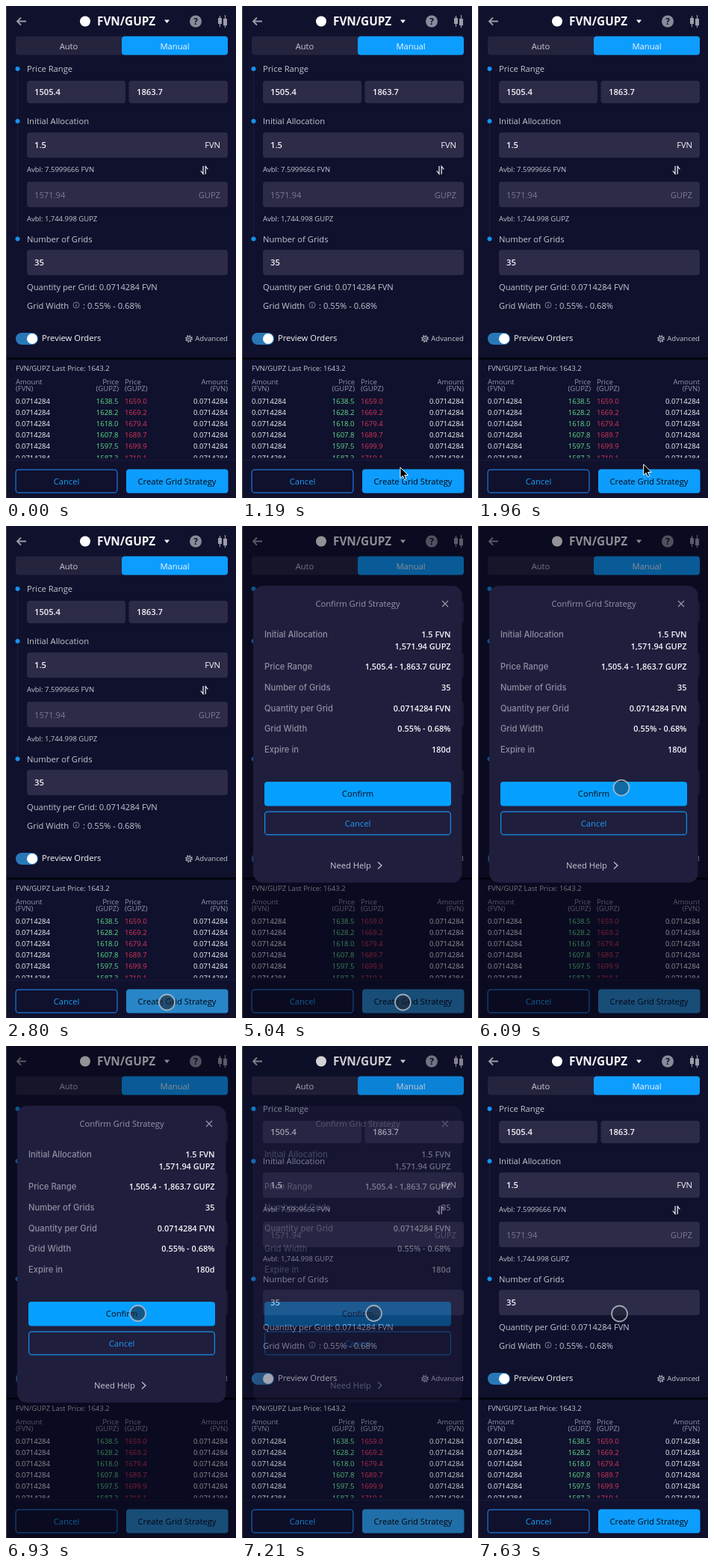
These frames come from a looping animation (308x658 px, 8000 ms). An HTML page:

```html
<!DOCTYPE html>
<html lang="en">
<head>
<meta charset="utf-8">
<title>Grid strategy</title>
<style>
html, body { margin: 0; width: 100%; height: 100%; overflow: hidden; background: #10112d; }
svg { display: block; width: 308px; height: 658px; }
text { font-family: "Open Sans", "Noto Sans", sans-serif; white-space: pre; }
.label { font-family: Inter, "Liberation Sans", sans-serif; font-weight: 500; }
</style>
</head>
<body>
<svg id="stage" viewBox="0 0 308 658"></svg>
<script>
const LOOP = 8000;
const BASE = 'FVN', QUOTE = 'GUPZ';
const WHITE = '#f6f6fa', SOFT = '#c6c6d2', GREY = '#9696a8', FIELD = '#2c2b48', BLUE = '#0d9dff';
const ANCHOR = { l: 'start', m: 'middle', r: 'end' };

const text = (s, x, y, size = 11.2, fill = SOFT, side = 'l', extra = '') =>
  `<text x="${x}" y="${y}" font-size="${size}" fill="${fill}" text-anchor="${ANCHOR[side]}" ${extra}>${s}</text>`;
const box = (x, y, w, h, fill, r = 4, extra = '') =>
  `<rect x="${x}" y="${y}" width="${w}" height="${h}" rx="${r}" fill="${fill}" ${extra}/>`;
const outline = (x, y, w, h, stroke) =>
  box(x + .6, y + .6, w - 1.2, h - 1.2, 'none', 4, `stroke="${stroke}" stroke-width="1.2"`);
const line = (d, stroke, width = 1) =>
  `<path d="${d}" fill="none" stroke="${stroke}" stroke-width="${width}"/>`;
const dot = (x, y, r, fill, extra = '') => `<circle cx="${x}" cy="${y}" r="${r}" fill="${fill}" ${extra}/>`;
const medium = 'font-weight="500"', semibold = 'font-weight="600"', bold = 'font-weight="700"';

function header() {
  return line('M27 20.5H15M20 15.5L15 20.5L20 25.5', '#9c9cab', 1.8) +
    dot(106, 20.5, 7, '#fff') +
    text(`${BASE}/${QUOTE}`, 122, 26, 15.3, WHITE, 'l', bold) +
    `<path d="M212 18.5h7l-3.5 4.5z" fill="${WHITE}"/>` +
    dot(254, 20.5, 8, '#8a8b9a') + text('?', 254, 25, 12, '#10112d', 'm', bold) +
    line('M286.5 13V28M293.5 12V29', '#9c9cab', 1.2) +
    box(284, 16, 5, 8, '#9c9cab', 0) + box(291, 17, 5, 9, '#9c9cab', 0) +
    box(13, 40.5, 284, 25, '#25243f') + box(155, 40.5, 142, 25, BLUE) +
    text('Auto', 84, 57.5, 11.2, SOFT, 'm') + text('Manual', 226, 57.5, 11.2, WHITE, 'm', medium);
}

function form() {
  const sections = [['Price Range', 84], ['Initial Allocation', 154], ['Number of Grids', 311.5]];
  const fields = [[28, 100, 132, 30], [164.5, 100, 132.5, 30], [28, 169, 269, 34], [28, 235, 269, 34], [28, 326, 269, 34]];
  const gear = dot(245, 445, 2.9, 'none', `stroke="${SOFT}"`) +
    dot(245, 445, 4.2, 'none', `stroke="${SOFT}" stroke-width="1.4" stroke-dasharray="1.65 1.65"`) +
    dot(245, 445, 1.1, SOFT);
  return line('M15.5 84V311', '#1c1d3b') +
    sections.map(([s, y]) => dot(15.5, y, 3, '#1592ee') + text(s, 28, y + 4)).join('') +
    fields.map(f => box(...f, FIELD)).join('') +
    text('1505.4', 38, 119, 11.2, WHITE, 'l', semibold) + text('1863.7', 175, 119, 11.2, WHITE, 'l', semibold) +
    text('1.5', 38, 190, 11.2, WHITE, 'l', semibold) + text(BASE, 287, 190, 11.2, WHITE, 'r', medium) +
    text(`Avbl: 7.5999666 ${BASE}`, 28, 222, 9.5) +
    line('M264 214V224.5L260.8 220.5M267.2 225V214.5L270.4 218.5', WHITE, 1.2) +
    text('1571.94', 38, 256.5, 11.2, '#7c7b91') + text(QUOTE, 287, 256.5, 11.2, '#7c7b91', 'r') +
    text(`Avbl: 1,744.998 ${QUOTE}`, 28, 288, 9.5) +
    text('35', 38, 347, 11.2, WHITE, 'l', semibold) +
    text(`Quantity per Grid: 0.0714284 ${BASE}`, 28, 380) +
    text('Grid Width', 28, 404.5) +
    dot(94, 400, 4, 'none', `stroke="${GREY}" stroke-width=".8"`) + line('M94 399.3V402.3M94 397.5V398.4', GREY) +
    text(': 0.55% - 0.68%', 103, 404.5) +
    box(13, 437, 30, 16, '#2878b8', 8) + dot(35, 445, 7, '#fff') +
    text('Preview Orders', 48, 448, 11.2, WHITE) + gear + text('Advanced', 297, 448, 9.6, SOFT, 'r');
}

function orders() {
  let s = box(0, 470, 308, 3, '#04040f', 0) +
    text(`${BASE}/${QUOTE} Last Price: 1643.2`, 13, 487.5, 9.5);
  const heads = [['Amount', BASE, 13, 'l'], ['Price', QUOTE, 151, 'r'], ['Price', QUOTE, 159, 'l'], ['Amount', BASE, 297, 'r']];
  for (const [name, unit, x, side] of heads)
    s += text(name, x, 505.5, 9.5, GREY, side) + text(`(${unit})`, x, 514.5, 9.5, GREY, side);
  for (let i = 0; i < 6; i++) {
    const y = 531.5 + 15.2 * i;
    s += text('0.0714284', 13, y, 9.5, WHITE) +
      text((1638.46 - 10.236 * i).toFixed(1), 150.5, y, 9.5, '#62e08a', 'r') +
      text((1659 + 10.22 * i).toFixed(1), 159, y, 9.5, '#e0355a') +
      text('0.0714284', 297, y, 9.5, WHITE, 'r');
  }
  return s + box(0, 604.5, 308, 54, '#10112d', 0) + line('M0 607.5H308', '#191a38') +
    outline(12.5, 619.5, 137, 32, '#1f78dc') + text('Cancel', 81, 639.5, 11.2, '#1a9cf5', 'm') +
    box(161, 619.5, 136.5, 32, BLUE, 4, 'id="create"') +
    text('Create Grid Strategy', 229, 639.5, 11.2, '#05060f', 'm', medium);
}

function dialog() {
  const rows = [
    ['Initial Allocation', 149, `1.5 ${BASE}`], ['', 164.5, `1,571.94 ${QUOTE}`],
    ['Price Range', 192, `1,505.4 - 1,863.7 ${QUOTE}`], ['Number of Grids', 219.7, '35'],
    ['Quantity per Grid', 247.5, `0.0714284 ${BASE}`], ['Grid Width', 275, '0.55% - 0.68%'],
    ['Expire in', 302.5, '180d']];
  return box(1, 0, 307, 658, '#04040f', 0, 'opacity=".43"') +
    box(15, 80, 279.5, 397, '#1f1e3d', 13) +
    text('Confirm Grid Strategy', 155, 108, 11.2, GREY, 'm') +
    line('M268 100L276 108M276 100L268 108', GREY, 1.2) +
    rows.map(([name, y, value]) => text(name, 30, y, 11.2, '#8f8fa2', 'l', 'class="label"') +
      text(value, 279.5, y, 10.9, WHITE, 'r', semibold)).join('') +
    box(30, 342, 250, 32.5, '#05a0ff') + text('Confirm', 155, 362, 11.2, '#05060f', 'm', medium) +
    outline(30, 381.5, 250, 32, '#1791ea') + text('Cancel', 155, 401.8, 11.2, '#1a9cf5', 'm') +
    text('Need Help', 118, 458, 11.2, SOFT) + line('M182 449.5L187 454L182 458.5', SOFT, 1.2);
}

const stage = document.getElementById('stage');
stage.innerHTML = box(0, 0, 308, 658, '#10112d', 0) + header() + form() + orders() +
  `<g id="dialog">${dialog()}</g>` + box(0, 0, 1, 658, '#4a4a55', 0) +
  `<g id="cursor">
    <path id="arrow" d="M0 0V14.5L3.4 11.4L5.6 16.6L8 15.6L5.8 10.5H10.4Z" fill="#000" stroke="#fff" stroke-width="1"/>
    <circle id="ring" r="10.5" stroke="#bcc2cc" stroke-opacity=".8" stroke-width="1.8"/>
  </g>`;
const [create, modal, cursor, arrow, ring] =
  ['create', 'dialog', 'cursor', 'arrow', 'ring'].map(id => document.getElementById(id));

// Pointer path: time, x, y
const path = [
  [420, 180, 632], [600, 184, 612], [780, 205, 606], [950, 217, 619], [1070, 206, 631], [1190, 212, 617],
  [1260, 208, 611], [1400, 186, 609], [1540, 198, 632], [1680, 221, 635],
  [1820, 221, 635], [1960, 222, 613], [2080, 186, 609], [2200, 192, 632], [2310, 215.5, 637],
  [5320, 215.5, 637], [5500, 223, 605], [5680, 219, 500], [5850, 203, 375], [5950, 194, 341],
  [6090, 192, 350], [6160, 188, 353], [6370, 176.5, 357.5],
  [7350, 176.5, 357.5], [7630, 189.5, 358]];

function pointAt(t) {
  const i = path.findIndex(p => p[0] > t);
  if (i < 0) return path[path.length - 1].slice(1);
  const a = path[Math.max(i - 1, 0)], b = path[i];
  const k = Math.min(1, Math.max(0, (t - a[0]) / (b[0] - a[0])));
  return [a[1] + (b[1] - a[1]) * k, a[2] + (b[2] - a[2]) * k];
}

function draw(now) {
  const t = now % LOOP, pressed = t >= 2520;
  const [x, y] = pointAt(t);
  cursor.setAttribute('transform', `translate(${x} ${y})`);
  arrow.setAttribute('visibility', t >= 420 && !pressed ? 'visible' : 'hidden');
  ring.setAttribute('visibility', pressed ? 'visible' : 'hidden');
  const deep = t >= 2800 && t < 5390 || t >= 6930 && t < 7210;
  ring.setAttribute('fill', `rgba(30,38,52,${deep ? .6 : .45})`);
  create.setAttribute('fill', t < 2520 || t >= 7280 ? BLUE : t < 2590 ? '#1a92e4' : '#2886c8');
  modal.setAttribute('opacity', t < 5040 || t >= 7280 ? 0 : t < 7210 ? 1 : .4);
  requestAnimationFrame(draw);
}
requestAnimationFrame(draw);
</script>
</body>
</html>
```
